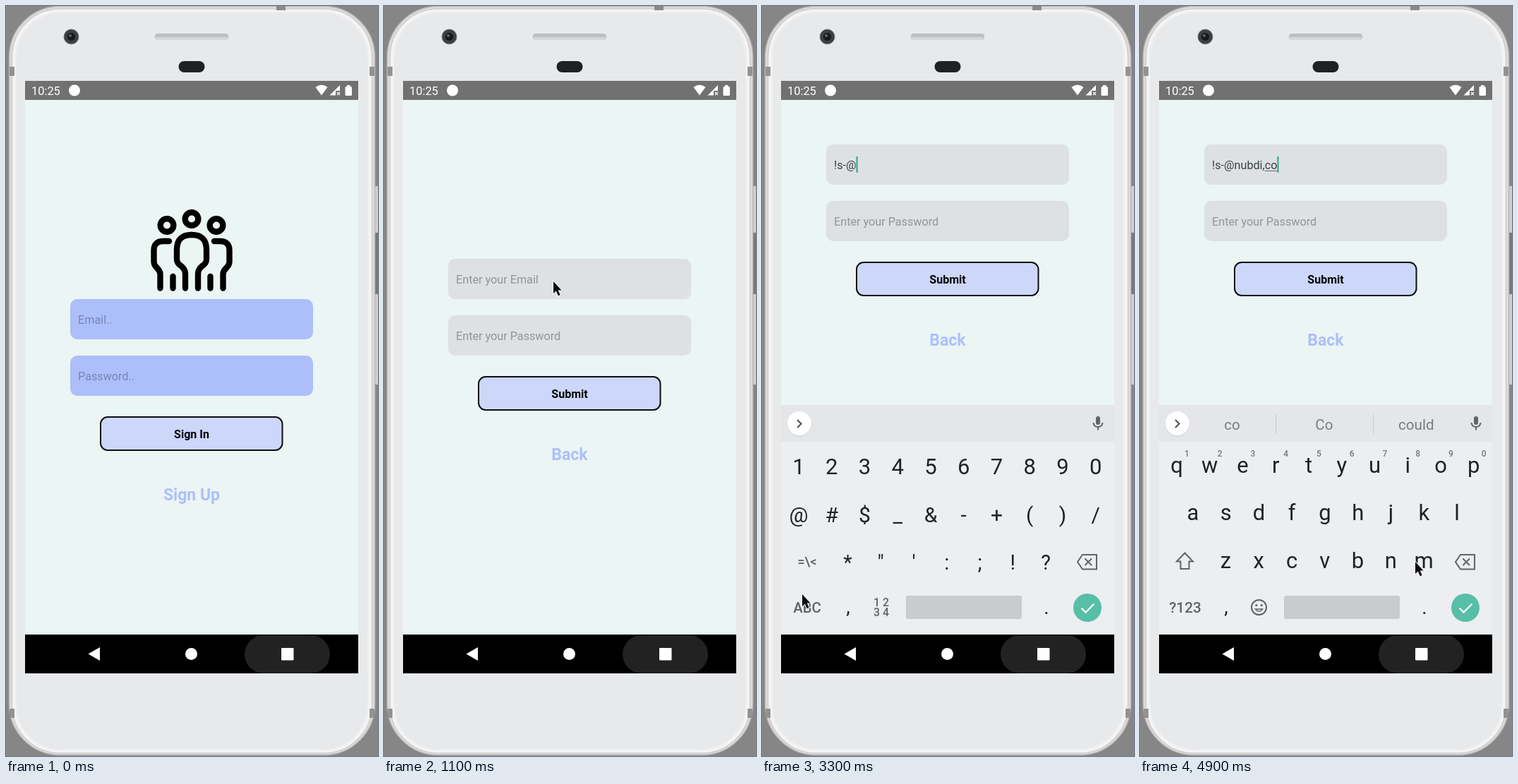
An HTML page with a canvas that plays this animation: 527x1062 px, repeating every 5 s.

```html
<!DOCTYPE html>
<html lang="en">
<head>
<meta charset="utf-8">
<title>Sign up</title>
<style>
html, body { margin: 0; width: 527px; height: 1062px; overflow: hidden; background: #868686; }
canvas { display: block; }
</style>
</head>
<body>
<canvas id="stage" width="527" height="1062"></canvas>
<script>
const ctx = document.getElementById('stage').getContext('2d');
const LOOP = 5000, STEP = 100, LIFT = 162;
const INK = '#1f2326', GREY = '#5f6467', GREEN = '#56bfa6', PALE = '#aebffb';
const LOGIN_FIELD = { fill: '#acbffa', hint: '#7684b6' };
const SIGNUP_FIELD = { fill: '#dde1e4', hint: '#909598' };

const TYPED = '!s-@nubdi,co';
const TYPED_AT = [1700, 2100, 2900, 3100, 3500, 3700, 3900, 4000, 4200, 4500, 4600, 4800];

// time, x, y of the pointer tip
const POINTER = [
  [100, 300, 480], [300, 250, 446], [500, 250, 446], [800, 262, 546], [900, 262, 546],
  [1000, 262, 546], [1100, 240, 390], [1200, 240, 400], [1300, 245, 721], [1500, 62, 850],
  [1700, 352, 785], [1900, 62, 850], [2100, 120, 717], [2300, 120, 717], [2500, 366, 625],
  [2700, 62, 850], [2900, 284, 720], [3100, 52, 720], [3300, 57, 833], [3500, 261, 717],
  [3700, 400, 785], [3900, 75, 717], [4000, 379, 650], [4200, 449, 717], [4400, 126, 850],
  [4500, 126, 850], [4600, 214, 785], [4800, 426, 650], [4900, 390, 787]
];

function box(x, y, w, h, r, fill, stroke, line = 1) {
  ctx.beginPath();
  ctx.roundRect(x, y, w, h, r);
  if (fill) { ctx.fillStyle = fill; ctx.fill(); }
  if (stroke) { ctx.strokeStyle = stroke; ctx.lineWidth = line; ctx.stroke(); }
}

function disc(x, y, r, fill, stroke, line = 1) {
  ctx.beginPath();
  ctx.arc(x, y, r, 0, Math.PI * 2);
  if (fill) { ctx.fillStyle = fill; ctx.fill(); }
  if (stroke) { ctx.strokeStyle = stroke; ctx.lineWidth = line; ctx.stroke(); }
}

function fillPath(d, color) {
  ctx.fillStyle = color;
  ctx.fill(new Path2D(d));
}

function strokePath(d, color, line = 2) {
  ctx.strokeStyle = color;
  ctx.lineWidth = line;
  ctx.stroke(new Path2D(d));
}

function text(s, x, y, size, color, align = 'center', weight = 400) {
  ctx.font = `${weight} ${size}px Roboto, sans-serif`;
  ctx.textAlign = align;
  ctx.fillStyle = color;
  ctx.fillText(s, x, y);
}

function at(x, y, draw) {
  ctx.save();
  ctx.translate(x, y);
  draw();
  ctx.restore();
}

function drawPhone() {
  ctx.fillStyle = '#868686';
  ctx.fillRect(0, 0, 527, 1062);
  box(523, 255, 6, 66, 1, '#d0cfcf');
  box(523, 321, 6, 87, 1, '#787878');
  box(523, 408, 6, 128, 1, '#d0cfcf');
  box(4.5, 0.5, 518, 1060, 72, '#dfdddc', '#bcb9b8', 1.5);
  box(8.5, 4, 510, 1054, 68, '#f4f4f5', '#cfcccb', 1.5);
  box(13, 8, 501, 1046, 64, '#eeeff1');
  box(15, 10, 497, 1042, 62, '#e8e9eb');
  for (const y of [86, 995]) {
    ctx.fillStyle = '#949191';
    ctx.fillRect(5, y, 7, 13);
    ctx.fillRect(515, y, 7, 13);
  }
  ctx.fillStyle = '#8b8989';
  ctx.fillRect(383, 0, 13, 6);
  disc(92.5, 43.5, 10.5, '#3d4043', '#777', 1);
  disc(92.5, 43.5, 5.5, '#17191b');
  disc(91, 42, 2, '#5d6770');
  box(211, 39, 104, 9, 4, '#bdbfc2');
  box(212, 44, 102, 4, 2, '#d5d6d9');
  box(244.5, 78, 37, 16, 8, '#202123');
}

function drawSystemBars() {
  ctx.fillStyle = '#717171';
  ctx.fillRect(27, 106, 472, 27);
  text('10:25', 36, 126, 16.4, '#fff', 'left');
  disc(97, 119.5, 8, '#fff');
  fillPath('M438.5 115Q447 108.5 455.5 115L447 126.5Z', '#fff');
  fillPath('M458.5 126.5L473 112V120H467V126.5Z', '#fff');
  strokePath('M469 122l4 4m0 -4l-4 4', '#fff', 1.3);
  box(480.5, 114, 9.5, 13, 1.5, '#fff');
  ctx.fillRect(483, 112, 4.5, 3);

  ctx.fillStyle = '#000';
  ctx.fillRect(27, 890, 472, 55);
  box(338, 891, 121, 54, 27, '#222');
  fillPath('M116.5 917.5L133 908V927Z', '#fff');
  disc(262.5, 917.5, 8.5, '#fff');
  box(390, 909, 17.5, 17.5, 1, '#fff');
}

function drawPeople() {
  ctx.lineCap = ctx.lineJoin = 'round';
  disc(263, 301.5, 9.3, null, '#000', 8.4);
  for (const side of [-1, 1]) {
    at(263, 0, () => {
      ctx.scale(side, 1);
      disc(35, 310.5, 9.3, null, '#000', 8.4);
      strokePath('M32 333H40Q53.5 333 53.5 346V362Q53.5 367 49 371Q44.5 375 44.5 380V399.5M26.5 383V399.5', '#000', 8.4);
      strokePath('M0 324Q21 324 21 345V359Q21 364 15 368Q9 373 9 379V399.5', '#000', 8.4);
    });
  }
  ctx.lineCap = 'butt';
  ctx.lineJoin = 'miter';
}

function drawField(y, value, fill, color) {
  box(91, y, 344, 57, 10, fill);
  text(value, 102, y + 34.5, 16.2, color, 'left');
}

function drawForm(y, labels, style, fade) {
  drawField(y, labels[0], style.fill, style.hint);
  drawField(y + 80, labels[1], style.fill, style.hint);
  box(134, y + 167, 257.5, 47, 10, '#ccd7fa', '#0b0d12', 2);
  text(labels[2], 263, y + 197, 16, '#000', 'center', 700);
  ctx.globalAlpha = fade;
  text(labels[3], 263, y + 285, 23, PALE, 'center', 700);
  ctx.globalAlpha = 1;
}

function drawEntry(value, y, t) {
  drawField(y, value || 'Enter your Email', SIGNUP_FIELD.fill, value ? '#3b4043' : SIGNUP_FIELD.hint);
  const end = 102 + ctx.measureText(value).width;
  const word = composing(value, t);
  if (word) {
    const w = ctx.measureText(word).width;
    ctx.fillStyle = '#666b6e';
    ctx.fillRect(end - w, y + 37, w, 1);
  }
  if (Math.floor((t + 100) / 400) % 2 === 0) {
    ctx.fillStyle = '#2ba58a';
    ctx.fillRect(end, y + 17, 2, 23);
  }
}

function composing(value, t) {
  if (t > 4300 && t < 4600) return '';
  const match = value.match(/[a-z]+$/);
  return match ? match[0] : '';
}

const icons = {
  square: () => box(-9, -9, 18, 18, 2, GREY),
  palette() {
    fillPath('M0 -10A10 10 0 0 0 0 10Q3 10 2 6Q2 4 4 4H6Q10 4 10 -1Q9 -10 0 -10Z', GREY);
    for (const [x, y] of [[-6, -1], [-3, -5.5], [3, -5.5], [6, -1]]) disc(x, y, 1.6, '#e4e7e9');
  },
  textCursor() {
    strokePath('M-3 -9H3M0 -9V9M-3 9H3', GREY);
    fillPath('M-11 0l5 -4v8zM11 0l-5 -4v8z', GREY);
  },
  oneHand() {
    strokePath('M-1 8H-8V-8H8V1', GREY);
    fillPath('M-1 -1H5V3L10 5L7 10H2Z', GREY);
  },
  search() {
    disc(-2.5, -2.5, 6, null, GREY, 2);
    strokePath('M2 2L9 9', GREY, 2.5);
  },
  sticker() {
    strokePath('M3 8H-6Q-8 8 -8 6V-6Q-8 -8 -6 -8H6Q8 -8 8 -6V3L3 8V3H8', GREY);
    disc(-3, -3, 1.4, GREY);
    disc(3, -3, 1.4, GREY);
    strokePath('M-4.5 1Q-2 4.5 1.5 2', GREY, 1.8);
  },
  gif: () => text('GIF', 0, 5.8, 16.5, GREY, 'center', 900),
  mic() {
    box(-3, -10, 6, 12, 3, GREY);
    strokePath('M-6.5 -1Q-6 5 0 5Q6 5 6.5 -1M0 5V9.5', GREY);
  },
  micOff() {
    icons.mic();
    strokePath('M-9 -9L10 10', '#e4e7e9', 4);
    strokePath('M-9.5 -9.5L9.5 9.5', GREY, 2);
  }
};

function drawToolbar(names, mic, suggestions) {
  ctx.fillStyle = '#e4e6e9';
  ctx.fillRect(27, 565, 472, 52);
  disc(53, 592, 17.5, '#d6d9db');
  disc(53, 591, 17, '#fff');
  strokePath(suggestions ? 'M50 586l5.5 5.5l-5.5 5.5' : 'M56 586l-5.5 5.5l5.5 5.5', '#4b4f52');
  at(476, 591, icons[mic]);
  if (suggestions) {
    suggestions.forEach((word, i) => text(word, 130.5 + 130.4 * i, 599.5, 20.6, '#797d80'));
    if (suggestions.length) strokePath('M192.5 578V606M330.5 578V606', '#c8cbce', 1);
    return;
  }
  names.forEach((name, i) => at(117 + 69 * i, 591, icons[name]));
  strokePath('M366.5 579V605', '#cdd0d2', 1);
  for (const x of [401, 408.5, 416]) disc(x, 591.5, 2.2, GREY);
}

function drawRow(keys, x, y, size = 31) {
  [...keys].forEach((key, i) => text(key, x + 46.75 * i, y, size, INK));
}

function drawKeys(symbols, emailKeys) {
  if (symbols) {
    drawRow('1234567890', 52, 663);
    drawRow('@#$_&-+()/', 52, 730.5, 30);
    drawRow('*"\':;!?', 121.5, 797.5, 29);
    text('=\\<', 64, 792.5, 18.5, GREY, 'center', 500);
    text('ABC', 64, 859, 20.3, GREY, 'center', 500);
    text('1 2', 169, 850, 15.8, GREY, 'center', 500);
    text('3 4', 169, 864, 15.8, GREY, 'center', 500);
  } else {
    drawRow('qwertyuiop', 52, 661);
    [...'1234567890'].forEach((n, i) => text(n, 66.5 + 46.75 * i, 637.5, 12, '#74787b', 'center', 500));
    drawRow('asdfghjkl', 75, 728);
    drawRow('zxcvbnm', 121.5, 795.5);
    strokePath('M63.5 774.5L75 786.5H69.5V797H57.5V786.5H52Z', GREY);
    text('?123', 64, 859, 20.8, GREY, 'center', 500);
    disc(168.5, 851.5, 10.5, null, GREY, 2);
    disc(164.8, 848.5, 1.6, GREY);
    disc(172.2, 848.5, 1.6, GREY);
    strokePath('M163.5 854Q168.5 860.5 173.5 854Z', GREY, 1.6);
  }
  strokePath('M454 777H474V797.5H454L447 787.2Z', GREY);
  strokePath('M457.5 782.5l9.5 9.5m0 -9.5l-9.5 9.5', GREY);
  if (emailKeys) text('@', 121.5, 860.5, 26, INK);
  else text(',', 122, 860, 28, INK);
  text('.', 403, 861, 28, INK);
  box(204, 835, 164, 33, 3, '#c8ccce');
  disc(461, 852, 20, GREEN);
  strokePath('M452.5 852.5l6 6l12 -12', '#fff', 2.3);
}

function drawKeyboard(value, t, login) {
  ctx.fillStyle = '#eceef1';
  ctx.fillRect(27, 565, 472, 325);
  const word = composing(value, t);
  let suggestions = null;
  if (word === 's') suggestions = ['s', 'so', 'sorry'];
  else if (word) suggestions = [word, word[0].toUpperCase() + word.slice(1), word[0] === 'c' ? 'could' : 'number'];
  else if (value && t < 4300) suggestions = [];
  const tools = login ? ['square', 'palette', 'textCursor', 'oneHand'] : ['search', 'sticker', 'gif', 'square'];
  drawToolbar(tools, login ? 'micOff' : 'mic', suggestions);
  const symbols = (t >= 1500 && t < 1900) || (t >= 2700 && t < 3400);
  drawKeys(symbols, login);
}

function drawPointer(t) {
  if (t < POINTER[0][0]) return;
  const next = POINTER.findIndex(p => p[0] > t);
  const [t0, x0, y0] = POINTER.at(next < 0 ? -1 : next - 1);
  const [t1, x1, y1] = next < 0 ? [t0 + 1, x0, y0] : POINTER[next];
  const u = (t - t0) / (t1 - t0), k = u * u * (3 - 2 * u);
  at(x0 + (x1 - x0) * k, y0 + (y1 - y0) * k, () => {
    const arrow = 'M0 0V17L3.8 13.5L6.8 20.2L9.6 19L6.7 12.4H11.5Z';
    strokePath(arrow, '#f4f4f4', 2);
    fillPath(arrow, '#0b0b0b');
  });
}

function keyboardOpen(t) {
  if (t < 400 || (t >= 1000 && t < 1200)) return 0;
  return t < 500 ? 0.5 : 1;
}

function render(t) {
  const login = t < 1000, open = keyboardOpen(t);
  const value = TYPED.slice(0, TYPED_AT.filter(time => time <= t).length);
  drawPhone();
  ctx.save();
  ctx.beginPath();
  ctx.rect(27, 133, 472, 757);
  ctx.clip();
  ctx.fillStyle = '#ebf5f3';
  ctx.fillRect(27, 133, 472, 757);
  if (login) {
    at(0, -LIFT * open, () => {
      drawPeople();
      const fade = t < 800 ? 1 : t < 900 ? 0.5 : 0.1;
      drawForm(415, ['Email..', 'Password..', 'Sign In', 'Sign Up'], LOGIN_FIELD, fade);
    });
  } else {
    const y = 196 + LIFT * (1 - open);
    drawForm(y, ['', 'Enter your Password', 'Submit', 'Back'], SIGNUP_FIELD, 1);
    drawEntry(value, y, t);
  }
  if (open) at(0, 325 * (1 - open), () => drawKeyboard(value, t, login));
  ctx.restore();
  drawSystemBars();
  drawPointer(t);
}

const start = performance.now();
function tick() {
  const t = (performance.now() - start) % LOOP;
  render(Math.floor(t / STEP) * STEP);
  requestAnimationFrame(tick);
}
tick();
</script>
</body>
</html>
```
